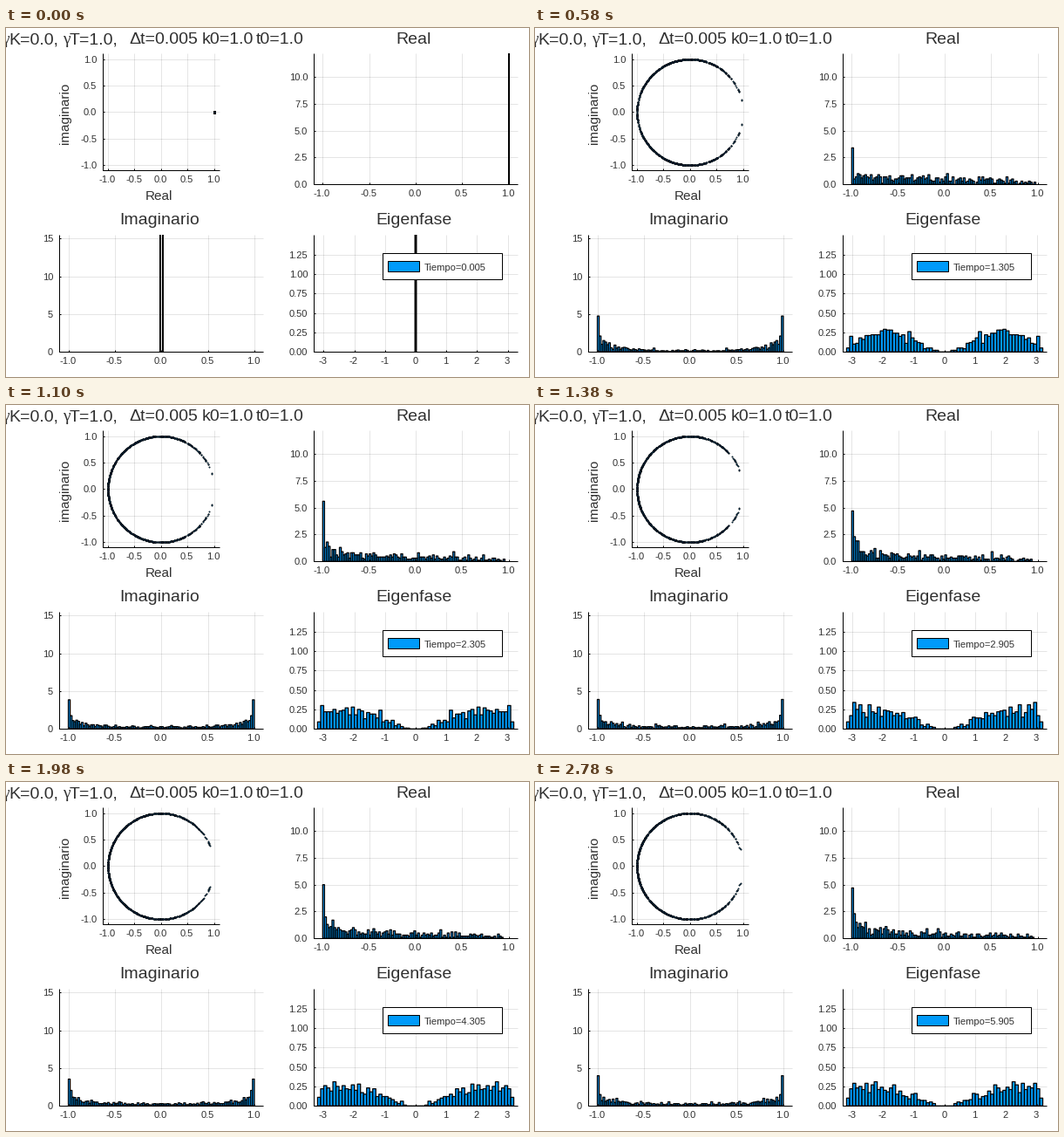
Animation, 600 px wide and 400 px high, one loop 2.88 s. Source, as a matplotlib script:

```python
import numpy as np
import matplotlib.pyplot as plt
from matplotlib.animation import FuncAnimation
from matplotlib.collections import PolyCollection
from matplotlib.patches import Rectangle

W, H, DPI = 600, 400, 100
PX = 72 / DPI              # one pixel in points
BLUE = "#009afa"
INK = "#303030"
N_PAIRS = 500
STEPS = 60

plt.rcParams["font.family"] = "Liberation Sans"
fig = plt.figure(figsize=(W / DPI, H / DPI), dpi=DPI, facecolor="white")
ax = fig.add_axes([0, 0, 1, 1])
ax.set_xlim(0.6, W + 0.6)
ax.set_ylim(H + 0.8, 0.8)
ax.axis("off")


def label(x, y, s, size=8, ha="center", **kw):
    kw.setdefault("va", "baseline")
    return ax.text(x, y, s, size=size, ha=ha, color=INK, zorder=6, **kw)


class Panel:
    """Plot area in stage pixels with its own linear scales."""

    def __init__(self, box, x_axis, y_axis, x_ticks, y_ticks, fmt):
        self.left, self.top, self.right, self.bottom = box
        self.x0, self.kx = x_axis
        self.y0, self.ky = y_axis
        x_fmt, y_fmt = fmt
        for v in x_ticks:
            x = self.x(v)
            self.line([x, x], [self.top, self.bottom], 0.1)
            self.line([x, x], [self.bottom, self.bottom - 2.5])
            label(x - 0.8, self.bottom + 13.5, x_fmt % v)
        for v in y_ticks:
            y = self.y(v)
            self.line([self.left, self.right], [y, y], 0.1)
            self.line([self.left, self.left + 2.5], [y, y])
            label(self.left - 6.7, y + 4, y_fmt % v, ha="right")
        self.line([self.left, self.left, self.right],
                  [self.top, self.bottom, self.bottom])

    def x(self, v):
        return self.x0 + self.kx * np.asarray(v)

    def y(self, v):
        return self.y0 - self.ky * np.asarray(v)

    def line(self, xs, ys, alpha=1):
        ax.plot(xs, ys, color="black", alpha=alpha, lw=PX,
                zorder=1 if alpha < 1 else 4, solid_capstyle="butt")

    def add_bars(self):
        self.bars = PolyCollection([], facecolor=BLUE, edgecolor="black",
                                   lw=1.25 * PX, zorder=2)
        self.bars.set_snap(False)
        ax.add_collection(self.bars, autolim=False)
        clip = Rectangle((self.left, self.top), self.right - self.left,
                         self.bottom - self.top, transform=ax.transData)
        self.bars.set_clip_path(clip)

    def set_bars(self, values):
        edges, dens = histogram(values)
        xs = self.x(edges)
        tops = np.maximum(self.y(dens), self.top - 10)
        base = self.bottom
        self.bars.set_verts([[(a, base), (a, t), (b, t), (b, base)]
                             for a, b, t in zip(xs[:-1], xs[1:], tops)])


def histogram(values, bins=100):
    """Density histogram with the bin width rounded up to 1, 2, 5 or 10."""
    lo, hi = values.min(), values.max()
    raw = (hi - lo) / bins
    unit = 10.0 ** np.floor(np.log10(raw))
    ratio = raw / unit
    step = unit * next(m for m in (1, 2, 5, 10) if ratio <= 1.1 * m or m == 10)
    first = np.floor(lo / step + 1e-6)
    last = max(np.ceil(hi / step - 1e-6), first + 1)
    edges = np.arange(first, last + 1) * step
    count, _ = np.histogram(np.clip(values, edges[0], edges[-1]), edges)
    return edges, count / (len(values) * step)


T_FULL = 1.305             # the phases first reach pi here
GRID = np.linspace(0, np.pi, 1200)


def density(t):
    """Level repulsion at zero, a gap that breathes, a tail that fills up."""
    gap = 0.21 + 0.16 * np.cos(1.21 * (t - 4.9))
    rise = 1 - np.exp(-(GRID / 1.25) ** 2)
    tail = 1 / (1 + np.exp((2.25 - GRID) / 0.15))
    return rise * (1 - 0.5 * np.exp((T_FULL - t) / 0.5) * tail) * (GRID > gap)


def phases(step):
    t = 0.005 + 0.1 * step
    late = max(t, T_FULL)
    cdf = np.cumsum(density(late))
    cdf /= cdf[-1]

    rng = np.random.default_rng(100 + step)
    u = (np.arange(N_PAIRS) + rng.uniform(-40, 40, N_PAIRS)) / N_PAIRS
    u = np.abs(u)
    u = np.where(u > 1, 2 - u, u)
    theta = np.interp(np.clip(u, 1e-4, 1), cdf, GRID)
    if t < late:
        # the levels fan out from a common speed, then grow linearly
        spread = 1 - np.exp(-t / 0.1)
        theta = t * (3 + (theta / late - 3) * spread)
    theta = np.concatenate([theta, -theta])
    return t, rng.permutation(theta)


halves = np.linspace(-1, 1, 5)
circle = Panel((111.5, 30, 245.5, 164), (178.4, 60.8), (97.3, 60.8),
               halves, halves, ("%.1f", "%.1f"))
real = Panel((353.5, 30, 588, 180), (470.6, 106.7), (180, 12.3),
             halves, np.arange(0, 11, 2.5), ("%.1f", "%.1f"))
imag = Panel((61.5, 238, 296, 372), (178.8, 106.7), (372, 8.65),
             halves, range(0, 16, 5), ("%.1f", "%d"))
phase = Panel((353.5, 238, 588, 372), (470.6, 35.17), (372, 89.2),
              range(-3, 4), np.arange(0, 1.3, 0.25), ("%d", "%.2f"))
for panel in (real, imag, phase):
    panel.add_bars()

dots, = ax.plot([], [], "o", ms=1.25 * PX, mfc=BLUE, mec="black",
                mew=0.65 * PX, zorder=3, snap=False)

# Titles and axis names
for x, s in [(4, "K=0.0,"), (73.5, "T=1.0,"), (141.5, "Δt=0.005"),
             (225, "k0=1.0"), (287, "t0=1.0")]:
    label(x, 19, s, 14, "left")
for x in (-4, 65.5):
    label(x, 19, "γ", 14, "left", family="Liberation Serif")
label(468.6, 19, "Real", 14)
label(177, 226, "Imaginario", 14)
label(468.6, 226, "Eigenfase", 14)
label(176.5, 198, "Real", 11)
label(68.5, 98.5, "imaginario", 11, rotation=90, va="center")

# Legend
for x, y, w, h, color in [(433, 259, 137, 30, "white"),
                          (439, 268, 36, 12, BLUE)]:
    ax.add_patch(Rectangle((x, y), w, h, fc=color, ec="black", lw=PX,
                           zorder=5))
clock = label(480.5, 279, "", ha="left")

# Every third step, and the last one, is held five times as long.
TIMELINE = [s for s in range(STEPS)
            for _ in range(5 if s % 3 == 1 or s == STEPS - 1 else 1)]


def update(tick):
    t, theta = phases(TIMELINE[tick])
    re, im = np.cos(theta), np.sin(theta)
    dots.set_data(circle.x(re), circle.y(im))
    real.set_bars(re)
    imag.set_bars(im)
    phase.set_bars(theta)
    clock.set_text("Tiempo=%.3f" % t)
    return dots, real.bars, imag.bars, phase.bars, clock


anim = FuncAnimation(fig, update, frames=len(TIMELINE), interval=20,
                     init_func=lambda: update(0), repeat=True, repeat_delay=0)
plt.show()
```
